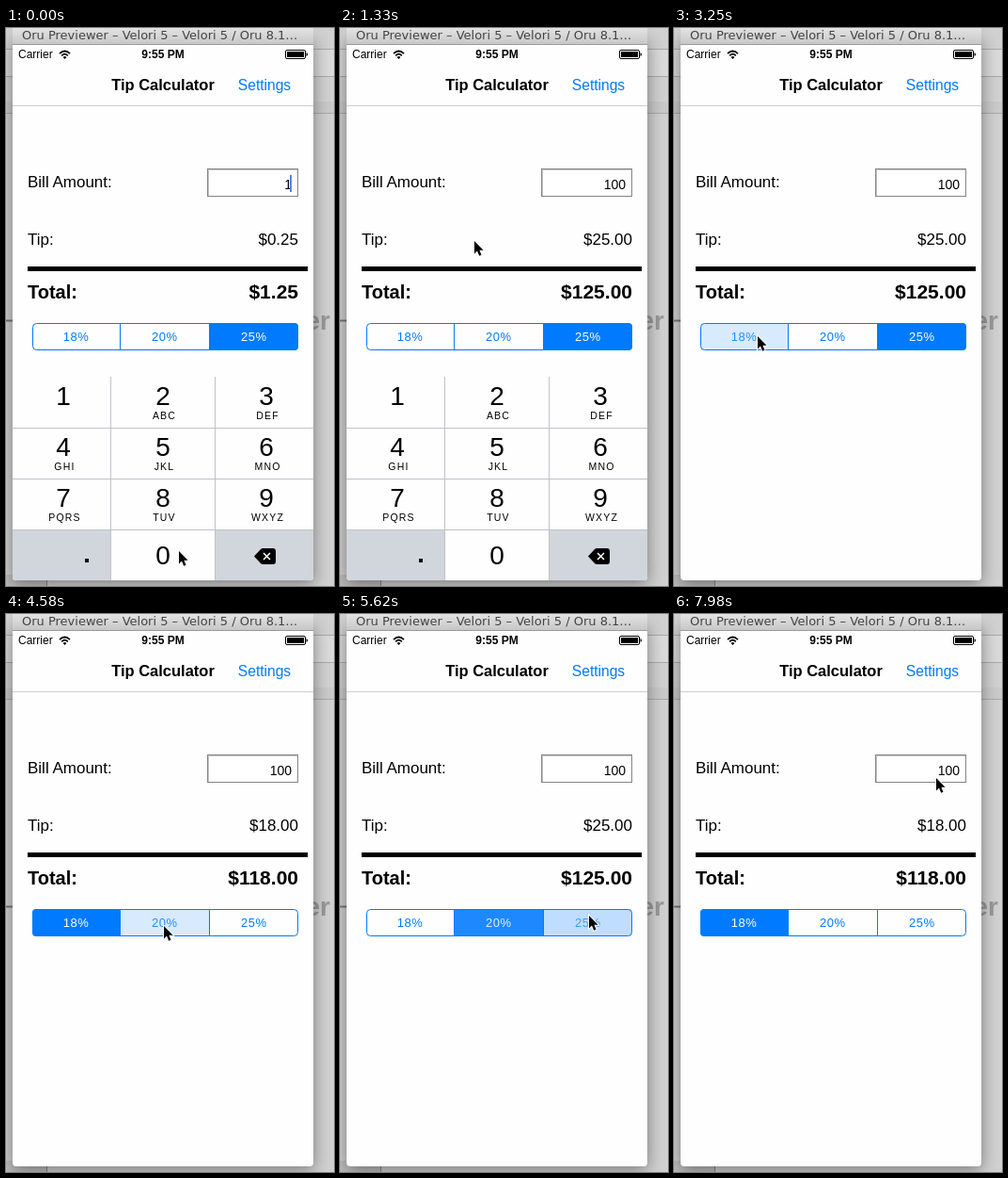
An HTML page that plays this animation: 349x592 px, repeating every 8 s.

```html
<!DOCTYPE html>
<html lang="en">
<head>
<meta charset="utf-8">
<title>Tip Calculator</title>
<style>
  html, body { margin: 0; width: 100%; height: 100%; overflow: hidden; background: #cdcdcd; }
  svg { display: block; width: 349px; height: 592px; }
  text { font-family: "Liberation Sans", Arial, sans-serif; fill: #000; white-space: pre; }
  .bold { font-weight: bold; }
  .mid { text-anchor: middle; }
  .end { text-anchor: end; }
  .letters { font-size: 10.5px; letter-spacing: 1.2px; }
</style>
</head>
<body>
<svg viewBox="0 0 349 592" xmlns="http://www.w3.org/2000/svg">
  <defs>
    <linearGradient id="titleBar" x2="0" y2="1">
      <stop stop-color="#e3e3e3"/><stop offset="1" stop-color="#c6c6c6"/>
    </linearGradient>
    <filter id="blur" x="-20%" y="-20%" width="140%" height="140%"><feGaussianBlur stdDeviation="9"/></filter>
    <clipPath id="screen"><path d="M7 18H327V582q0 4-4 4H11q-4 0-4-4Z"/></clipPath>
  </defs>

  <!-- desktop behind the phone window -->
  <rect width="349" height="592" fill="#d0d0d0"/>
  <rect y="22" width="349" height="29" fill="#d9d9d9"/>
  <path d="M0 22.5H349M0 51.5H349M0 90.5H349" stroke="#a9a9a9"/>
  <rect y="78" width="349" height="12" fill="#c9c9c9"/>
  <path d="M0 310.5H10" stroke="#777" stroke-width="2"/>
  <rect y="580" width="43" height="12" fill="#bdbdbd"/>
  <path d="M43.5 580V592" stroke="#888"/>
  <text class="bold" x="318.5" y="320" font-size="28" style="fill:#999">er</text>
  <rect x="7" y="14" width="320" height="576" fill="#000" opacity=".42" filter="url(#blur)"/>

  <!-- window title -->
  <path d="M7 18V0H327V18Z" fill="url(#titleBar)"/>
  <path d="M7 17.5H327" stroke="#999"/>
  <text x="17" y="12" font-size="13" style="font-family:'DejaVu Sans',sans-serif;fill:#444">Oru Previewer – Velori 5 – Velori 5 / Oru 8.1…</text>

  <g clip-path="url(#screen)">
    <rect x="7" y="18" width="320" height="568" fill="#fefefe"/>

    <!-- status bar -->
    <text x="13" y="32" font-size="12">Carrier</text>
    <g fill="none" stroke="#000" stroke-width="1.7">
      <path d="M57 27.2Q62.5 21.8 68 27.2M59.2 29.4Q62.5 26 65.8 29.4"/>
    </g>
    <path d="M60.6 31Q62.5 29.2 64.4 31L62.5 33Z"/>
    <text class="bold mid" x="167" y="32" font-size="12">9:55 PM</text>
    <rect x="297.5" y="23.5" width="21" height="9" rx="1.5" fill="none" stroke="#000"/>
    <rect x="299" y="25" width="18" height="6"/>
    <path d="M319.5 26q1.5.5 1.5 2t-1.5 2Z"/>

    <!-- navigation bar -->
    <text class="bold mid" x="167" y="66" font-size="16.5">Tip Calculator</text>
    <text class="mid" x="275" y="66" font-size="15.6" style="fill:#007aff">Settings</text>
    <path d="M7 82.5H327" stroke="#cfcfcf"/>

    <!-- form -->
    <text x="23" y="168.5" font-size="17">Bill Amount:</text>
    <rect x="214.5" y="149.5" width="96" height="29" fill="#fff" stroke="#858585"/>
    <path d="M215.5 178V150.5H310" fill="none" stroke="#c4c4c4"/>
    <text id="bill" class="end" x="304" y="171" font-size="14"></text>
    <rect id="caret" x="302" y="156" width="2" height="18" fill="#5b7fe8"/>
    <text x="23" y="229.5" font-size="17">Tip:</text>
    <text id="tip" class="end" x="311" y="229.5" font-size="17"></text>
    <rect x="23" y="253" width="298" height="5"/>
    <text class="bold" x="23" y="287" font-size="20">Total:</text>
    <text id="total" class="bold end" x="311" y="287" font-size="21"></text>
    <g id="segments"></g>
    <rect x="28.5" y="313.5" width="282" height="28" rx="4" fill="none" stroke="#007aff"/>
    <path d="M121.5 313V342M216.5 313V342" stroke="#007aff"/>

    <g id="keyboard">
      <rect x="7" y="370" width="320" height="216" fill="#fefefe"/>
      <path d="M7 533H111V586H7ZM223 533H327V586H223Z" fill="#d1d5dc"/>
      <rect id="zeroKey" x="112" y="533" width="110" height="53" fill="#d1d5dc"/>
      <path d="M7 424.5H327M7 478.5H327M7 532.5H327M111.5 370V586M222.5 370V586" stroke="#c0c2c6"/>
      <g id="keys"></g>
      <rect x="84" y="563" width="4" height="4"/>
      <path d="M264 560.5L271 553Q272 552 273.5 552H284Q287 552 287 555V566Q287 569 284 569H273.5Q272 569 271 568Z"/>
      <path d="M274 557L281 564M281 557L274 564" stroke="#fff" stroke-width="1.5"/>
    </g>
  </g>

  <path id="pointer" d="M1 1V14.5L4 11.6L6.2 16.8L8.5 15.8L6.4 10.8H10.6Z"
    stroke="#fff" stroke-width="1.8" paint-order="stroke"/>
</svg>

<script>
const LOOP = 8000, STEP = 147.8, FADE = 350;
const $ = id => document.getElementById(id);
const clamp = v => Math.min(1, Math.max(0, v));
const smooth = v => v * v * (3 - 2 * v);

function add(parent, tag, attrs, text = "") {
  const node = document.createElementNS("http://www.w3.org/2000/svg", tag);
  for (const name in attrs) node.setAttribute(name, attrs[name]);
  node.textContent = text;
  parent.append(node);
  return node;
}

const columns = [61, 167, 277];
["", "ABC", "DEF", "GHI", "JKL", "MNO", "PQRS", "TUV", "WXYZ"].forEach((letters, i) => {
  const x = columns[i % 3], y = 400 + 54 * Math.floor(i / 3);
  add($("keys"), "text", { class: "mid", x, y, "font-size": 28 }, i + 1);
  add($("keys"), "text", { class: "mid letters", x: x + 1.5, y: y + 15 }, letters);
});
add($("keys"), "text", { class: "mid", x: 167, y: 569, "font-size": 28 }, "0");

const rates = [18, 20, 25];
const shapes = ["M122 313H32q-4 0-4 4V338q0 4 4 4H122Z", "M121 313H217V342H121Z", "M216 313H307q4 0 4 4V338q0 4-4 4H216Z"];
const segments = rates.map((rate, i) => ({
  back: add($("segments"), "path", { d: shapes[i], fill: "#007aff" }),
  label: add($("segments"), "text",
    { class: "mid", x: [74.5, 168.8, 263.8][i], y: 332, "font-size": 13, "letter-spacing": .5 }, rate + "%")
}));

// Segment taps: index, press time, release time.
const taps = [[2, -2000, -1900], [0, 3240, 3385], [1, 4570, 4715], [2, 5450, 5575], [0, 6190, 6318]];

// Pointer stops: time, x, y.
const stops = [
  [0, 183, 554], [600, 183, 554], [1330, 142, 225], [1478, 140, 162], [1630, 140, 162],
  [2364, 88, 326], [3400, 88, 326], [3842, 165, 330], [4000, 165, 330], [4138, 167, 330],
  [4880, 167, 330], [5320, 264, 319], [5700, 264, 319], [6130, 62, 334], [6800, 62, 334],
  [7240, 256, 158], [7400, 256, 158], [7980, 278, 173]
];

function pointerAt(t) {
  const next = stops.findIndex(stop => stop[0] > t);
  if (next < 0) return stops.at(-1).slice(1);
  const [t0, x0, y0] = stops[next - 1], [t1, x1, y1] = stops[next];
  const p = smooth((t - t0) / (t1 - t0));
  return [Math.round(x0 + (x1 - x0) * p), Math.round(y0 + (y1 - y0) * p)];
}

function levelsAt(t) {
  const levels = [0, 0, 0];
  for (const [index, press, release] of taps) {
    if (t < press) break;
    const p = clamp((t - release) / FADE);
    levels.forEach((level, i) => {
      levels[i] = i === index ? .15 + .85 * p : level * (1 - p);
    });
  }
  return levels;
}

const money = value => "$" + value.toFixed(2);
const within = (t, from, to) => t >= from && t < to;
const show = (id, on) => $(id).setAttribute("visibility", on ? "visible" : "hidden");

function draw(time) {
  const t = Math.floor((time + 8) / STEP) * STEP;

  const bill = t < 290 ? 1 : t < 585 ? 10 : 100;
  const rate = rates[taps.findLast(tap => tap[2] <= t)[0]];
  const tip = bill * rate / 100;
  $("bill").textContent = bill;
  $("tip").textContent = money(tip);
  $("total").textContent = money(bill + tip);

  show("caret", t < 1100);
  show("zeroKey", within(t, 140, 290) || within(t, 440, 585));

  const slide = smooth(clamp((t - 1530) / 400));
  $("keyboard").setAttribute("transform", `translate(0 ${216 * slide})`);
  show("keys", slide < 1);

  levelsAt(t).forEach((level, i) => {
    segments[i].back.setAttribute("opacity", level);
    segments[i].label.style.fill = `rgb(${255 * level},${122 + 133 * level},255)`;
  });

  $("pointer").setAttribute("transform", `translate(${pointerAt(t)})`);
}

function tick(now) {
  draw(now % LOOP);
  requestAnimationFrame(tick);
}
draw(0);
requestAnimationFrame(tick);
</script>
</body>
</html>
```
